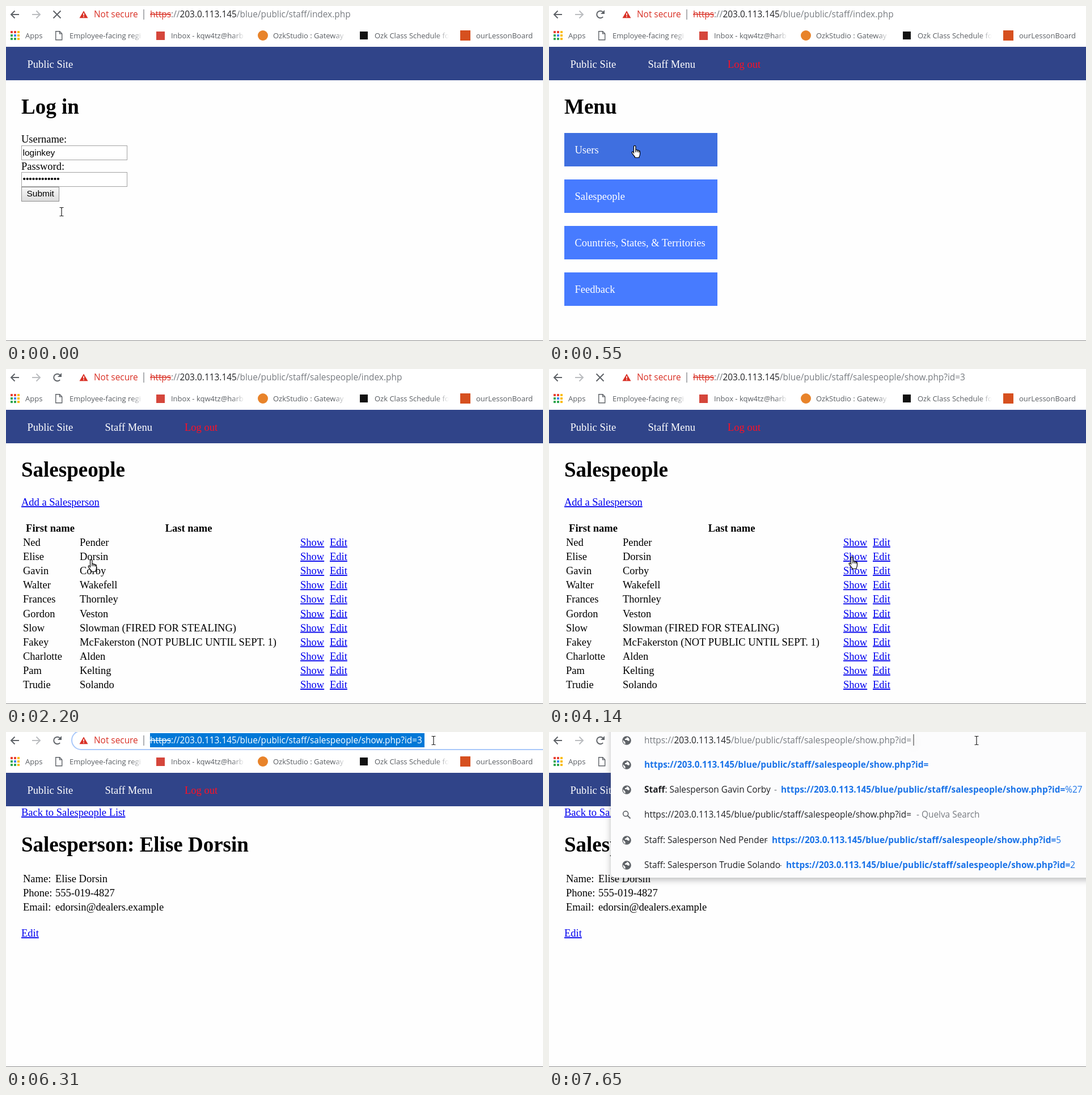
Write an HTML page that moves like this. It is 947 by 591 pixels and loops after 8000 ms.

```html
<!DOCTYPE html>
<html lang="en">
<head>
<meta charset="utf-8">
<title>Staff area</title>
<style>
  html, body { margin: 0; width: 100%; height: 100%; overflow: hidden; background: #fff; }
  svg { display: block; width: 100vw; height: 100vh; }
  text { white-space: pre; }
  .ui { font-family: "Open Sans", "Noto Sans", sans-serif; font-size: 15.4px; }
  .mark { font-size: 13px; fill: #5a5e63; }
  .page { font-family: "Liberation Serif", "Times New Roman", serif; font-size: 18.5px; }
  .h1 { font-size: 37px; font-weight: 700; }
  .bold { font-weight: 700; }
  .link { fill: #0000ee; text-decoration: underline; }
  .white { fill: #fff; }
  .field { font-family: "Liberation Sans", Arial, sans-serif; font-size: 15.5px; }
  .gray { fill: #777b80; }
  .dark { fill: #202124; }
  .blue { fill: #1a73e8; }
  .strike { fill: #d93025; text-decoration: line-through; }
  .selected tspan { fill: #fff; }
  .line { fill: none; stroke: #5f6368; stroke-width: 2; }
  #drop > rect { filter: drop-shadow(0 4px 6px rgba(60, 64, 67, .35)); }
</style>
</head>
<body>
<svg id="stage" viewBox="0 0 947 591" preserveAspectRatio="none"></svg>
<script>
const LOOP = 8000;
const HOST = '203.0.113.145';
const BASE = '/blue/public/staff/';
const SHOW = BASE + 'salespeople/show.php?id=';

const people = [
  ['Ned', 'Pender'], ['Elise', 'Dorsin'], ['Gavin', 'Corby'], ['Walter', 'Wakefell'],
  ['Frances', 'Thornley'], ['Gordon', 'Veston'], ['Slow', 'Slowman (FIRED FOR STEALING)'],
  ['Fakey', 'McFakerston (NOT PUBLIC UNTIL SEPT. 1)'], ['Charlotte', 'Alden'],
  ['Pam', 'Kelting'], ['Trudie', 'Solando']
];

const text = (x, y, s, cls = '', more = '') => `<text x="${x}" y="${y}" class="${cls}" ${more}>${s}</text>`;
const span = (cls, s) => `<tspan class="${cls}">${s}</tspan>`;
const rect = (x, y, w, h, fill, more = '') =>
  `<rect x="${x}" y="${y}" width="${w}" height="${h}" fill="${fill}" ${more}/>`;
const line = (d, more = '') => `<path class="line" d="${d}" ${more}/>`;
const group = (id, body, cls = '') => `<g id="${id}" class="${cls}">${body}</g>`;

const address = path =>
  span('strike', 'https') + span('gray', '://') + span('dark', HOST) + span('gray', path);

function toolbar() {
  const dots = '#ea4335 #ea4335 #fbbc05 #34a853 #4285f4 #fbbc05 #34a853 #34a853 #fbbc05'.split(' ')
    .map((c, i) => rect(8 + i % 3 * 6, 44 + Math.floor(i / 3) * 6, 4, 4, c)).join('');
  const marks = [
    [34, 'Apps'], [112, 'Employee-facing regi', 242], [291, 'Inbox - kqw4tz@harb', 421],
    [471, 'OzkStudio : Gateway', 600], [650, 'Ozk Class Schedule fo', 781], [829, 'ourLessonBoard']
  ].map(([x, s, end]) => text(x, 57, s, 'mark') + (end ? rect(end - 22, 42, 40, 22, 'url(#fade)') : '')).join('');
  return rect(0, 0, 947, 72, '#fff')
    + line('M23 15H9M15.5 8.5L9 15l6.5 6.5')
    + line('M46 15h14M53.5 8.5L60 15l-6.500 6.5', 'style="stroke:#bbbdc0"')
    + group('busy', line('M83.500 8.500l13 13M96.500 8.500l-13 13'))
    + group('idle', line('M95.200 19.200A6.300 6.300 0 1 1 94.800 10.300')
      + '<path d="M98 7v7h-7z" fill="#5f6368"/>')
    + dots + marks
    + line('M87.700 44.700h7l4 4v11h-11zM94.500 44.700v4.200h4', 'style="stroke-width:1.4"')
    + rect(265, 45, 15, 15, '#d5463b')
    + '<circle cx="453" cy="52" r="9" fill="#e8832a"/>'
    + rect(624, 45, 14, 14, '#111')
    + rect(801, 43, 18, 18, '#d6501f')
    + group('hover', rect(116, -1, 860, 32, '#f1f3f4', 'rx="16"'))
    + group('focus', rect(116, -2, 860, 33, '#fff', 'rx="16.500" stroke="#a9c8fa" stroke-width="2"'))
    + '<path d="M137 8.500l7.500 12.800h-15z" fill="#d93025"/>'
    + rect(136.2, 12.5, 1.6, 4.3, '#fff') + rect(136.2, 18, 1.6, 1.6, '#fff')
    + text(155, 20, 'Not secure', '', 'fill="#d93025"')
    + rect(242.5, 6, 1, 18, '#5f6368')
    + group('selection', rect(254, 2, 484, 25, '#0078d7'))
    + '<text id="url" x="254" y="20"></text>'
    + group('caret', rect(738, 5, 1, 20, '#222'));
}

function dropdown() {
  const globe = y => `<circle cx="137" cy="${y}" r="7.800" fill="#5f6368"/>`
    + `<path d="M130.500 ${y - 1}l4 4v3.500q-4-2-4-7.500zM137 ${y - 6}q5 1 5 6l-2 1-3-2h-3v-2l3-1z" fill="#fff"/>`;
  const full = 'https://' + HOST + SHOW;
  const hit = (y, title, x, id) => globe(y - 5) + text(168, y, title, 'dark')
    + text(x - 12, y, '-', 'gray') + text(x, y, span('bold', full) + id, 'blue');
  const name = i => 'Salesperson ' + people[i].join(' ');
  return rect(109, -20, 860, 277, '#fcfcfd', 'rx="8"')
    + globe(15)
    + text(168, 20, span('gray', 'https://') + span('dark', HOST) + span('gray', SHOW))
    + rect(642.5, 4, 1, 20, '#333')
    + globe(58) + text(168, 63, full, 'bold blue')
    + hit(107, span('bold', 'Staff') + ': ' + name(2), 409, '%27')
    + line('M138.500 147.500l5 5', 'style="stroke-width:1.800"')
    + '<circle class="line" cx="135.200" cy="144.200" r="4.500" style="stroke-width:1.700"/>'
    + text(168, 151, full, 'dark') + text(648, 151, '- Quelva Search', 'gray')
    + hit(196, 'Staff: ' + name(0), 393, '5')
    + hit(240, 'Staff: ' + name(10), 418, '2');
}

const login = () => text(27, 190, 'Log in', 'h1')
  + text(27, 241, 'Username:') + text(27, 289, 'Password:')
  + rect(27.5, 246.5, 186, 25, '#fff', 'stroke="#a3a3a3"')
  + rect(27.5, 293.5, 186, 25, '#fff', 'stroke="#a3a3a3"')
  + text(29.5, 263.5, 'loginkey', 'field') + text(29.5, 310, '•'.repeat(12), 'field')
  + rect(27.5, 319.5, 66, 25, 'url(#button)', 'stroke="#8f8f8f"')
  + text(36.5, 336, 'Submit', 'field');

const menu = () => text(27, 190, 'Menu', 'h1')
  + ['Users', 'Salespeople', 'Countries, States, &amp; Territories', 'Feedback'].map((s, i) =>
    rect(27, 224 + 82 * i, 270, 59, '#477bff', 'class="item"') + text(45.5, 260 + 82 * i, s, 'white')).join('');

const table = () => text(27, 190, 'Salespeople', 'h1')
  + text(27, 241, 'Add a Salesperson', 'link')
  + text(78, 287, 'First name', 'bold', 'text-anchor="middle"')
  + text(322, 287, 'Last name', 'bold', 'text-anchor="middle"')
  + people.map(([first, last], i) => {
    const y = 312 + 25.1 * i;
    return text(30, y, first) + text(130, y, last) + text(519, y, 'Show', 'link') + text(571, y, 'Edit', 'link');
  }).join('');

function profile() {
  const who = people[1].join(' ');
  const rows = [['Name:', who], ['Phone:', '555-019-4827'], ['Email:', 'edorsin@dealers.example']];
  return text(27, 148, 'Back to Salespeople List', 'link')
    + text(27, 211, 'Salesperson: ' + who, 'h1')
    + rows.map(([k, v], i) => text(30, 265 + 25.1 * i, k) + text(87, 265 + 25.1 * i, v)).join('')
    + text(27, 361, 'Edit', 'link');
}

const gradient = (id, vertical, stops) =>
  `<linearGradient id="${id}" x2="${vertical ? 0 : 1}" y2="${vertical ? 1 : 0}">`
  + stops.map(([o, c, a]) => `<stop offset="${o}" stop-color="${c}" stop-opacity="${a}"/>`).join('')
  + '</linearGradient>';

const cursors =
  group('hand', '<path transform="translate(-5.500)" fill="#fff" stroke="#000" stroke-width="1.200" '
    + 'd="M4 13V2a1.700 1.700 0 0 1 3.400 0V8q1.500-1 3 .6q1.600-.7 2.600.9q2-.3 2 1.800V15q0 3-1.600 5v1.500H6V20'
    + 'Q4 18 1 13.600Q0 11.500 1.600 11.200Q3 11.200 4 13zM7.400 8v4M10.400 8.600v3.500M13 9.500v3"/>')
  + group('ibeam', '<path fill="none" stroke="#222" stroke-width="1.200" d="M-3.500-7.500h2.500l1 1 1-1h2.500M0-6.500v13M-3.500 7.500h2.500l1-1 1 1h2.500"/>')
  + group('arrow', '<path fill="#fff" stroke="#000" d="M0 0v16l3.700-3.500 2.500 6 2.700-1.200-2.500-5.800h5z"/>');

const $ = id => document.getElementById(id);
$('stage').innerHTML = '<defs>'
  + gradient('fade', false, [[0, '#fff', 0], [.55, '#fff', 1]])
  + gradient('button', true, [[0, '#f8f8f8', 1], [1, '#dcdcdc', 1]]) + '</defs>'
  + rect(0, 0, 947, 591, '#fefefe')
  + group('tools', toolbar(), 'ui')
  + group('body', rect(0, 72, 947, 59, '#304489')
    + text(37.5, 109, 'Public Site', 'white')
    + group('member', text(174.5, 109, 'Staff Menu', 'white') + text(315, 109, 'Log out', '', 'fill="#ff1024"'))
    + group('login', login()) + group('menu', menu())
    + group('table', table()) + group('profile', profile()), 'page')
  + rect(0, 590, 947, 1, '#8c8c8c')
  + group('drop', dropdown(), 'ui')
  + group('cursor', cursors);

// Pointer moves: first step, last step, number of steps, goal
const moves = [
  [120, 550, 4, 151, 246], [670, 1090, 4, 152, 252], [1220, 1520, 3, 150, 336],
  [2320, 2890, 5, 535, 338], [3040, 3190, 2, 541, 333], [3460, 3590, 2, 534, 331],
  [4690, 5640, 8, 746, 15], [5760, 5910, 2, 754, 15]
];

function pointer(t) {
  let x = 98, y = 363;
  for (const [from, to, n, gx, gy] of moves) {
    if (t < from) break;
    const k = Math.min(1, Math.floor((t - from) / (to - from) * (n - 1) + 1.001) / n);
    x += (gx - x) * k;
    y += (gy - y) * k;
  }
  return [x, y];
}

const show = (id, on) => { $(id).style.display = on ? '' : 'none'; };
const items = [...document.querySelectorAll('.item')];
let lastUrl = '';

function draw(t) {
  const within = (a, b) => t >= a && t < b;
  const page = t < 120 ? 'login' : t < 2060 ? 'menu' : t < 4290 ? 'table' : 'profile';
  const [x, y] = pointer(t);
  const over = items.map((_, i) => y >= 224 + 82 * i && y < 283 + 82 * i);

  let kind = 'ibeam';
  if (page === 'menu') kind = over.includes(true) ? 'hand' : 'arrow';
  if (page === 'table') kind = t < 2320 || x > 518 ? 'hand' : 'ibeam';
  if (page === 'profile') kind = t < 4690 ? 'hand' : y < 32 ? 'ibeam' : 'arrow';

  for (const id of ['login', 'menu', 'table', 'profile']) show(id, id === page);
  for (const id of ['hand', 'ibeam', 'arrow']) show(id, id === kind);
  items.forEach((el, i) => el.setAttribute('fill', over[i] ? '#3f6fe0' : '#477bff'));
  $('cursor').setAttribute('transform', `translate(${x} ${y})`);

  const busy = t < 120 || within(1930, 2060) || within(4020, 4290);
  show('busy', busy);
  show('idle', !busy);
  show('member', page !== 'login');
  show('hover', y < 32 && t < 6310);
  show('focus', t >= 6310);
  show('selection', within(6310, 6840));
  show('caret', within(6840, 7400));
  show('drop', t >= 7400);
  $('url').setAttribute('class', within(6310, 6840) ? 'selected' : '');

  const url = t < 1930 ? BASE + 'index.php' : t < 4020 ? BASE + 'salespeople/index.php' : SHOW + '3';
  if (url !== lastUrl) $('url').innerHTML = address(lastUrl = url);
}

const start = performance.now();
function tick(now) {
  draw(Math.max(0, now - start) % LOOP);
  requestAnimationFrame(tick);
}
draw(0);
requestAnimationFrame(tick);
</script>
</body>
</html>
```
